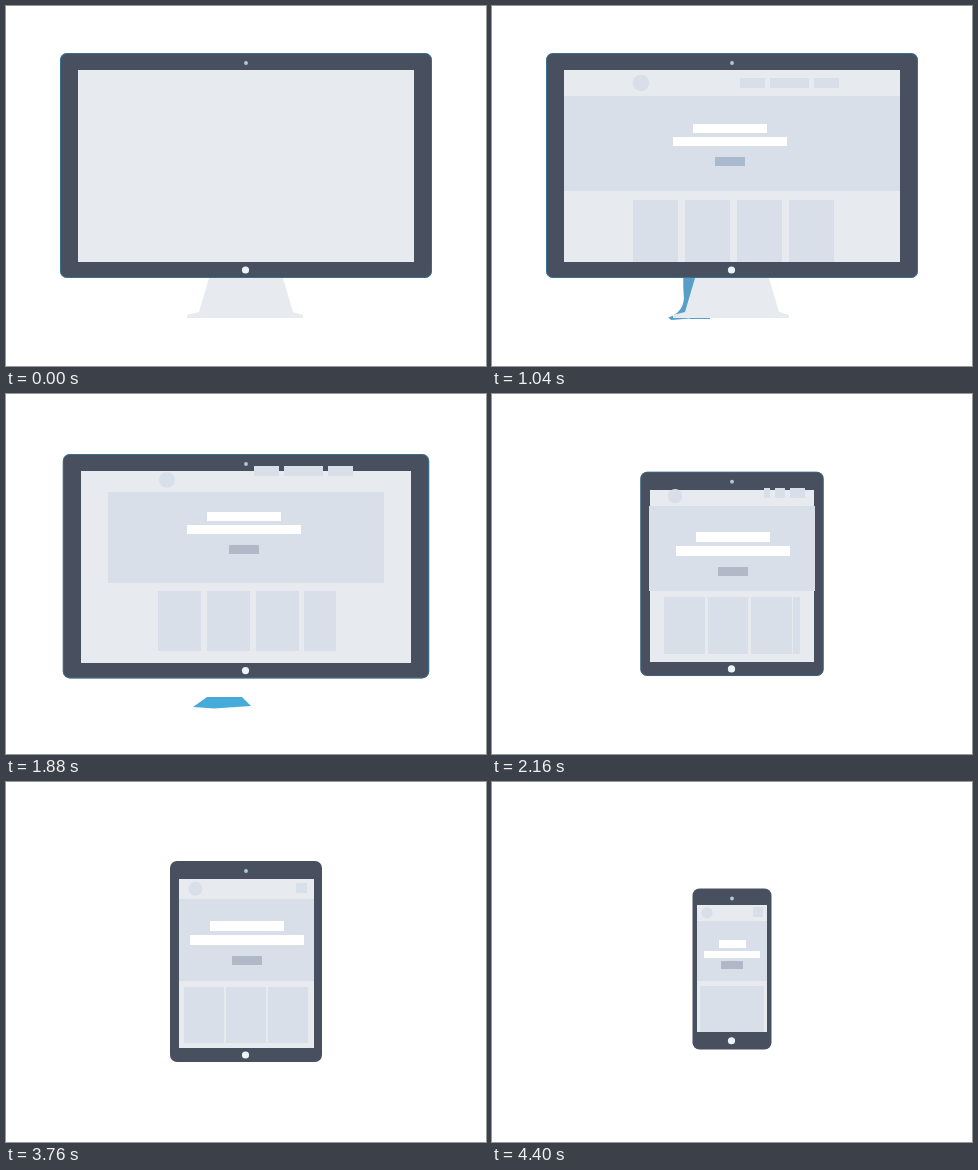
Recreate the animation shown at these times as an HTML page with a canvas. Size 480 px wide and 360 px high, loop 5320 ms.

```html
<!DOCTYPE html>
<html lang="en">
<head>
<meta charset="utf-8">
<title>Responsive devices</title>
<style>
html, body { margin: 0; width: 100%; height: 100%; overflow: hidden; background: #fff; }
canvas { display: block; width: 480px; height: 360px; }
</style>
</head>
<body>
<canvas id="stage" width="480" height="360"></canvas>
<script>
const ctx = document.getElementById('stage').getContext('2d');
const LOOP = 5320, STEP = 40, CX = 240;
const DARK = '#485060', SCREEN = '#e7ebf0', BLOCK = '#d8dfe8', WHITE = '#fff';

const monitor = layout({
  w: 372, h: 225, y: 47, side: 18, top: 17, bottom: 16, head: 26, hero: 95,
  left: 141, row: 200.5, count: 4, gap: 7.5, pad: [8.5, 0],
  logo: [149, 8.3], nav: [25, 39, 25], right: 347,
  text: { cx: 238, y: 28, pitch: 13, drop: 33, h: 9.4, widths: [74.5, 114, 29.5] }
});
const tablet = layout({
  w: 152, h: 201, y: 79, side: 8.5, top: 18, bottom: 14, head: 19.5, hero: 82.5,
  left: 178, row: 124, count: 3, gap: 2, pad: [6, 5],
  logo: [189.5, 7], nav: [0, 0, 11], right: 301,
  text: { cx: 241, y: 22.5, pitch: 14, drop: 34.5, h: 9.8, widths: [74, 114, 29.5] }
});
const phone = layout({
  w: 79, h: 161, y: 106.5, side: 4.5, top: 16, bottom: 17.5, head: 16.5, hero: 60,
  left: 208, row: 64, count: 1, gap: 0, pad: [5, 0],
  logo: [215, 5.6], nav: [0, 0, 10], right: 271,
  text: { cx: 240, y: 19, pitch: 10.5, drop: 21, h: 7.5, widths: [27, 56, 22] }
});

// Each group of parts leaves the monitor pose at its own pace.
const pace = { size: [1840, 2260], rise: [1600, 2240], page: [1620, 2340], nav: [1880, 2300], text: [1880, 2200] };

// Turns a device's measures into rectangles [x, y, w, h].
function layout(d) {
  const body = [CX - d.w / 2, d.y, d.w, d.h];
  const screen = [body[0] + d.side, d.y + d.top, d.w - 2 * d.side, d.h - d.top - d.bottom];
  const hero = [screen[0], screen[1] + d.head, screen[2], d.hero];
  const midHead = screen[1] + d.head / 2;

  const cardW = (d.row - (d.count - 1) * d.gap) / d.count;
  const cardY = hero[1] + d.hero + d.pad[0];
  const cardH = screen[1] + screen[3] - d.pad[1] - cardY;
  const cards = [0, 1, 2, 3].map(i => i < d.count
    ? [d.left + i * (cardW + d.gap), cardY, cardW, cardH]
    : [d.left + d.row, cardY, 0, cardH]);

  let edge = d.right;
  const nav = [2, 1, 0].map(i => {
    const item = [edge - d.nav[i], midHead - 5.5, d.nav[i], 10];
    edge = item[0] - 5;
    return item;
  }).reverse();

  const x = d.text;
  const text = [0, x.pitch, x.drop].map((dy, i) =>
    [x.cx - x.widths[i] / 2, hero[1] + x.y + dy, x.widths[i], x.h]);
  return { body, screen, hero, cards, nav, text, logo: [d.logo[0], midHead, d.logo[1]] };
}

const ease = (t, a, b) => {
  const k = Math.min(1, Math.max(0, (t - a) / (b - a)));
  return k * k * (3 - 2 * k);
};
const mix = (a, b, k) => a.map((v, i) => v + (b[i] - v) * k);
const inflate = ([x, y, w, h], dx, dy) => [x - dx, y - dy, w + 2 * dx, h + 2 * dy];
const growX = ([x, y, w, h], k) => [x, y, w * k, h];
const growUp = ([x, y, w, h], k) => [x, y + h * (1 - k), w, h * k];
const rgb = c => `rgb(${c.map(Math.round)})`;

function pose(pick, t, group) {
  const first = mix(pick(monitor), pick(tablet), ease(t, ...pace[group]));
  return mix(first, pick(phone), ease(t, 3760, group == 'text' ? 4360 : 4280));
}

// Snaps to whole pixels for crisp edges.
function rect([x, y, w, h], color) {
  const l = Math.round(x), u = Math.round(y);
  ctx.fillStyle = color;
  ctx.fillRect(l, u, Math.round(x + w) - l, Math.round(y + h) - u);
}
function dot(x, y, r, color) {
  ctx.fillStyle = color;
  ctx.beginPath();
  ctx.arc(x, y, r, 0, Math.PI * 2);
  ctx.fill();
}
function poly(p, color) {
  ctx.fillStyle = color;
  ctx.beginPath();
  for (let i = 0; i < p.length; i += 2) ctx.lineTo(p[i], p[i + 1]);
  ctx.fill();
}

// Blue shape that swings out from behind the stand and partly back.
function drawSwoosh(t) {
  const fade = ease(t, 560, 1040);
  const k = ease(t, 160, 480) - 0.55 * fade - 0.45 * ease(t, 1600, 1780);
  if (k < 0.01) return;
  const waist = 196 - 9 * k, toe = 196 - 44 * k;
  ctx.fillStyle = rgb(mix([71, 179, 224], [88, 158, 200], fade));
  ctx.beginPath();
  ctx.moveTo(203 - 26 * k, 272);
  ctx.quadraticCurveTo(waist - 1, 282, waist, 292);
  ctx.quadraticCurveTo(waist - 1, 307, toe, 311.5);
  ctx.lineTo(toe + 3, 314);
  ctx.lineTo(198, 312.5);
  ctx.lineTo(206, 272);
  ctx.fill();
  rect([198, 312, 45 * k, 1], ctx.fillStyle);
}

function drawStand(t, bottom) {
  const fold = 1 - ease(t, 1740, 1860);
  ctx.save();
  ctx.translate(CX, bottom);
  ctx.scale(1, fold);
  poly([-37, 0, 37, 0, 47, 34, 57, 37, 57, 40, -59, 40, -59, 37, -47, 34], SCREEN);
  ctx.restore();
}

function drawScrap(t) {
  if (t < 1800 || t > 2040) return;
  poly([201, 303, 236, 303, 245, 312, 208, 314.5, 187, 313], '#46abd8');
}

function drawDevice(t) {
  const swell = t < 1880 ? Math.sin(Math.PI * Math.max(0, t - 1600) / 280) : 0;
  const [body, screen] = ['body', 'screen'].map(name => {
    const r = pose(d => d[name], t, 'size');
    r[1] = pose(d => d[name], t, 'rise')[1];
    return inflate(r, 9 * swell, 12 * swell);
  });
  const [x, y, w, h] = body, bottom = y + h;
  drawStand(t, bottom);

  ctx.beginPath();
  ctx.roundRect(x, y, w, h, 7);
  ctx.fillStyle = DARK;
  ctx.fill();
  ctx.globalAlpha = 0.6 * (1 - ease(t, 2000, 2400));
  ctx.beginPath();
  ctx.roundRect(x + 0.5, y + 0.5, w - 1, h - 1, 6.5);
  ctx.strokeStyle = '#2f86a8';
  ctx.stroke();
  ctx.globalAlpha = 1;

  rect(screen, SCREEN);
  dot(CX, y + 10, 1.9, '#aecbd6');
  dot(CX - 0.5, (screen[1] + screen[3] + bottom) / 2, 3.6, '#ebf4fa');
}

function drawPage(t) {
  const [hx, hy, hw, hh] = pose(d => d.hero, t, 'page');
  rect([hx, hy, hw, hh * ease(t, 40, 320)], BLOCK);
  const [lx, ly, lr] = pose(d => d.logo, t, 'page');
  dot(lx, ly, lr * ease(t, 120, 320), BLOCK);

  for (let i = 0; i < 3; i++) {
    const start = 220 + 80 * i;
    rect(growX(pose(d => d.nav[i], t, 'nav'), ease(t, start, start + 180)), BLOCK);
  }
  for (let i = 0; i < 4; i++) {
    const start = 640 + 80 * i;
    rect(growUp(pose(d => d.cards[i], t, 'page'), ease(t, start, start + 160)), BLOCK);
  }
  const action = rgb(mix([169, 186, 207], [177, 185, 200], ease(t, 1600, 1880)));
  for (let i = 0; i < 3; i++) {
    const start = i < 2 ? 400 : 600;
    const item = pose(d => d.text[i], t, 'text');
    rect(growX(item, ease(t, start, start + 165 + 25 * i)), i < 2 ? WHITE : action);
  }
}

function draw(t) {
  ctx.fillStyle = WHITE;
  ctx.fillRect(0, 0, 480, 360);
  drawSwoosh(t);
  drawScrap(t);
  drawDevice(t);
  drawPage(t);
}

const begin = performance.now();
function tick() {
  const t = (performance.now() - begin) % LOOP;
  draw(Math.floor(t / STEP) * STEP);
  requestAnimationFrame(tick);
}
tick();
</script>
</body>
</html>
```
